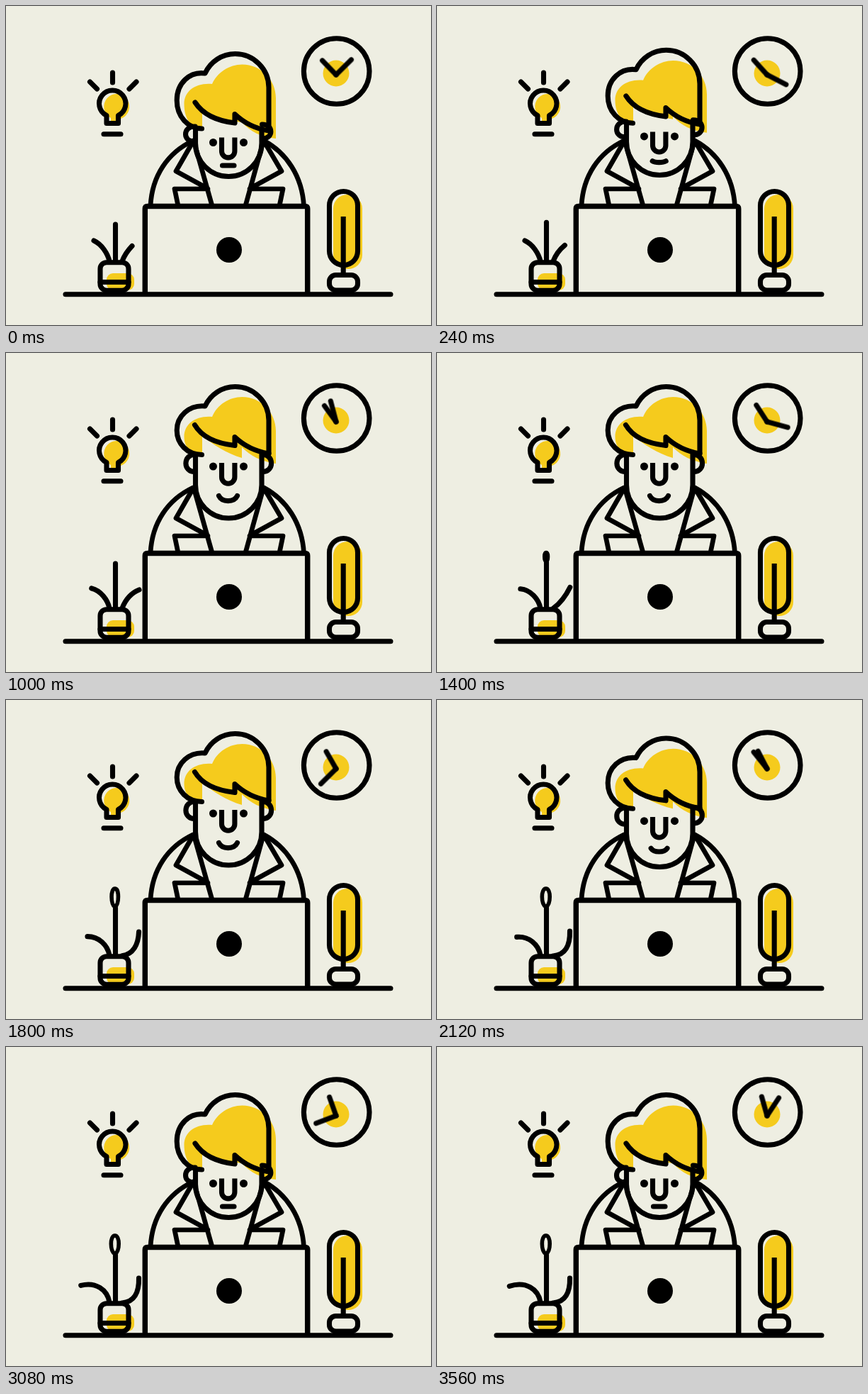
An HTML page that plays this animation: 600x450 px, repeating every 3.6 s.

```html
<!DOCTYPE html>
<html lang="en">
<head>
<meta charset="utf-8">
<title>At the desk</title>
<style>
  html, body { margin: 0; width: 100%; height: 100%; overflow: hidden; background: #eeeee2; }
  svg { display: block; width: 600px; height: 450px; }

  .ink { fill: none; stroke: #000; stroke-width: 7.1; stroke-linecap: round; stroke-linejoin: round; }
  .coat { stroke-width: 6.7; }
  .paper { fill: #eeeee2; }
  .sun { fill: #f5cb1d; stroke: none; }
  .butt { stroke-linecap: butt; }

  .head { animation: nod 3600ms cubic-bezier(.37, 0, .63, 1) infinite; }
  @keyframes nod {
    0%, 71%, 100% { d: var(--down); }
    19.4%, 51.2% { d: var(--up); }
  }

  .glow {
    --down: path("M277,173 C262,173 251.5,160 251.5,138 C251.5,120 268,108 291,110 C298,94 315,82.5 333.5,82.5 C360,82.5 381,104 381,130 V187 C360,185 345,177 333,164 V164 C310,162 290,155 277,146 Z");
    --up: path("M277,143 C262,143 251.5,134 251.5,118 C251.5,100 268,88 291,90 C298,73 315,62 333.5,62 C360,62 381,84 381,110 V156 C360,153 345,145 333,133 V148 C312,142 292,129 277,117 Z");
  }
  .hair {
    --down: path("M276.5,173 C257,173 241.2,156 241.2,133 C241.2,109 259,92 281,95 C288.8,78.3 305,67.5 323.5,67.5 C349.7,67.5 371,88.8 371,115 V175.5");
    --up: path("M276.5,143.5 C256,143.5 241.2,128 241.2,109 C241.2,89.5 258,73 281,75 C288.8,58.3 305,47.5 323.5,47.5 C349.7,47.5 371,68.8 371,95 V142");
  }
  .fringe {
    --down: path("M267,136 C276,150 293,161.5 323,165 V152.5 C335,164 352,173 371,176");
    --up: path("M266.5,101.5 C275,116 292,127 323,130.5 V118.5 C335,130 351,138.5 371,142");
  }
  .face {
    --down: path("M267.5,173 V193.5 A46.75,47 0 0 0 361,193.5 V173");
    --up: path("M267.5,143 V186 A46.75,47 0 0 0 361,186 V143");
  }
  .ears {
    --down: path("M267,170 C249,169 249,193 267,191 M361.5,167 C378,167 378,187.5 361.5,187");
    --up: path("M267,143.5 C249.5,142.5 249.5,168.5 267,167.5 M361.5,143.5 C379,142.5 379,168.5 361.5,167.5");
  }
  .eyes {
    stroke-width: 11;
    --down: path("M292.5,192.5 h0 M335.5,192.5 h0");
    --up: path("M292.5,160 h0 M335.5,160 h0");
  }
  .nose {
    --down: path("M304.5,185.5 V204.7 A9.2,9.2 0 0 0 322.9,204.7 V185.5");
    --up: path("M304.5,155 V175 A9.2,9.2 0 0 0 322.9,175 V155");
  }
  .mouth {
    --down: path("M305.5,225 C309,225 318,225 322,225");
    --up: path("M300.5,201.5 C305,211 322,211 326.5,201.5");
  }

  .hand { transform-origin: 466px 97px; animation: 3600ms linear infinite; }
  .minute { animation-name: minute; }
  .hour { animation-name: hour; }
  @keyframes minute { from { transform: rotate(45deg); } to { transform: rotate(1125deg); } }
  @keyframes hour { from { transform: rotate(-44deg); } to { transform: rotate(-15.5deg); } }

  .plant path { animation: 3600ms linear infinite; }
  .plant .left { animation-name: left; }
  .plant .right { animation-name: right; }
  .plant .stem { animation-name: stem; }
  .plant .bud { stroke-width: 5.6; animation-name: bud; }
  @keyframes left {
    0%, 15.3% { d: path("M146,360 C143.5,349 135,336 124,331"); }
    100% { d: path("M146,360 C143,341 125,330 102,337.5"); }
  }
  @keyframes right {
    0% { d: path("M164,360 C167.3,351.3 172.3,344.4 178,338.5"); }
    27.8% { d: path("M164,360 C169,347 178,338 188,334"); }
    53%, 100% { d: path("M164,361 C181,360 188,346 187.5,326"); }
  }
  @keyframes stem {
    0% { d: path("M154.5,360 V308"); }
    27.8% { d: path("M154.5,360 V297"); }
    50%, 100% { d: path("M154.5,360 V293"); }
  }
  @keyframes bud {
    0% { d: path("M154.5,308 C154.5,308 154.5,308 154.5,308 C154.5,308 154.5,308 154.5,308"); }
    27.8% { d: path("M154.5,297 C154.5,297 154.5,297 154.5,297 C154.5,297 154.5,297 154.5,297"); }
    50% { d: path("M153.8,292 C147.5,288 147.5,266 153.8,266 C160,266 160,288 153.8,292"); }
    58.3%, 100% { d: path("M153.8,292 C146.5,288 146.5,266 153.8,266 C161,266 161,288 153.8,292"); }
  }
</style>
</head>
<body>
<svg viewBox="0 0 600 450">
  <!-- light bulb -->
  <g class="ink">
    <path class="sun" d="M148,158 A18,18 0 1 1 162,159 V167 H148 Z"/>
    <path d="M142,165.5 V154.5 A18.7,18.7 0 1 1 158.5,154.5 V165.5 Z"/>
    <path d="M138,180.7 H162 M150.5,94 V108 M118.5,107 L128.5,117 M184,107 L174,117"/>
  </g>

  <!-- clock -->
  <g class="ink">
    <circle class="sun" cx="466" cy="95" r="18.5"/>
    <circle cx="466.7" cy="92" r="46.3"/>
    <path class="hand hour" d="M466,97 V69"/>
    <path class="hand minute" d="M466,97 V66.7"/>
  </g>

  <!-- person -->
  <g class="ink">
    <path class="sun head glow"/>
    <g class="coat">
      <path d="M204,282 C206,240 228,207 264,190 M420.5,282 C418,240 396,207 364,190"/>
      <path d="M265,190 L291,282 M263,193 L240,233 L283,256.5 M243,282 L238,258 H285"/>
      <path d="M363.5,190 L338,282 M365.5,193 L389,233 L346,256.5 M386,282 L391,258 H344"/>
    </g>
    <path class="head ears"/>
    <path class="head face"/>
    <path class="head hair"/>
    <path class="head fringe"/>
    <path class="head eyes"/>
    <path class="head nose butt"/>
    <path class="head mouth"/>
  </g>

  <!-- plant -->
  <g class="ink">
    <rect class="sun" x="142" y="377" width="39" height="24" rx="9"/>
    <g class="plant">
      <path class="left"/>
      <path class="right"/>
      <path class="stem"/>
      <path class="bud"/>
    </g>
    <rect x="133" y="361.7" width="40" height="39.5" rx="9"/>
    <path d="M133,389.5 H173"/>
  </g>

  <!-- lamp -->
  <g class="ink">
    <rect class="sun" x="462" y="266" width="41" height="105" rx="20"/>
    <rect x="456.5" y="261.5" width="40" height="104" rx="20"/>
    <path class="butt" d="M476.2,297 V380"/>
    <rect class="paper" x="456.5" y="379.5" width="40" height="21.5" rx="9"/>
  </g>

  <!-- laptop and desk -->
  <g class="ink">
    <path class="paper" d="M196.3,406 V286 Q196.3,282.5 200,282.5 H422 Q425.7,282.5 425.7,286 V406" stroke-width="7.5"/>
    <circle cx="315" cy="344" r="18" fill="#000" stroke="none"/>
    <path d="M84,406.8 H543"/>
  </g>
</svg>
</body>
</html>
```
